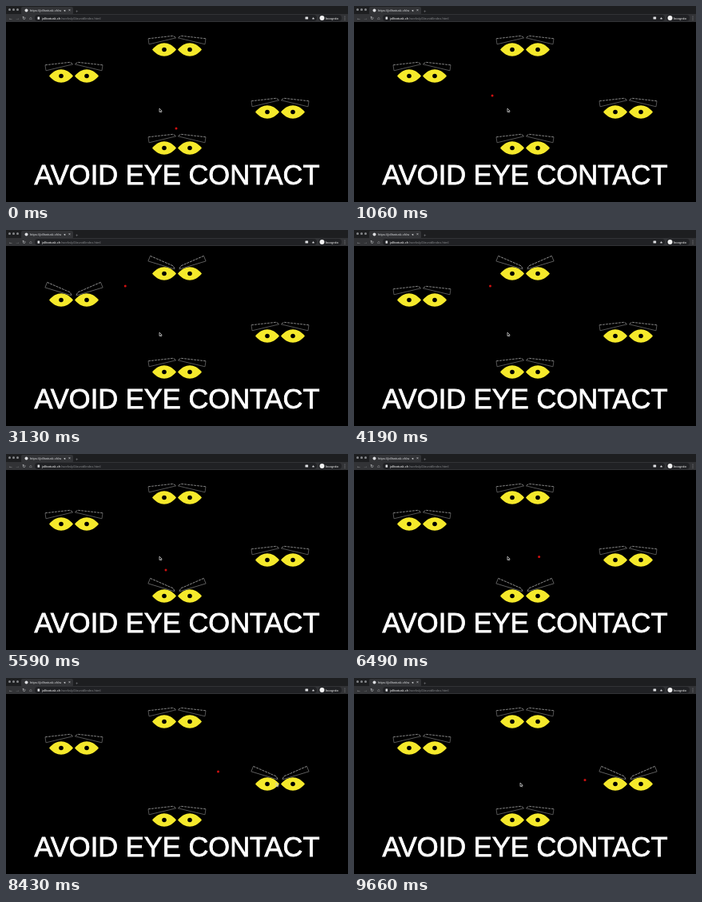
Animation, 428 px wide and 245 px high, one loop 9690 ms. Source, as an HTML page with a canvas:

```html
<!DOCTYPE html>
<html lang="en">
<head>
<meta charset="utf-8">
<title>Avoid eye contact</title>
<style>
  html, body { margin: 0; width: 100%; height: 100%; overflow: hidden; background: #000; }
  canvas { display: block; }
</style>
</head>
<body>
<canvas width="428" height="245"></canvas>
<script>
const ctx = document.querySelector('canvas').getContext('2d');
const LOOP = 9690;
const REACTION_TIME = 500;
const REACH = { x: 79, y: 50 };
const faces = [
  { x: 214, y: 54.5 }, { x: 85, y: 87.5 }, { x: 343, y: 132.5 }, { x: 214, y: 177.5 }
];

// The gaze rests on a few spots and jumps between them.
const gazePath = [
  { at: 0, x: 213, y: 153 },
  { at: 2130, x: 132, y: 70 },
  { at: 4190, x: 170.5, y: 70 },
  { at: 5590, x: 200, y: 145 },
  { at: 7390, x: 263, y: 112 },
  { at: 8430, x: 265.5, y: 117 },
  { at: 9660, x: 289, y: 127.5 }
];
const cursorPath = [
  { at: 7390, x: 192, y: 128 },
  { at: 8430, x: 338, y: 131 },
  { at: 9660, x: 208, y: 131 }
];

// Rest, quick eased move, rest.
function jump(progress) {
  const p = Math.min(1, Math.max(0, (progress - 0.3) / 0.4));
  return p * p * (3 - 2 * p);
}

function positionAt(path, time) {
  const next = path.findIndex(key => key.at > time);
  if (next === 0) return path[0];
  if (next < 0) return path[path.length - 1];
  const from = path[next - 1], to = path[next];
  const k = jump((time - from.at) / (to.at - from.at));
  return { x: from.x + (to.x - from.x) * k, y: from.y + (to.y - from.y) * k };
}

function disc(x, y, radius, color) {
  ctx.fillStyle = color;
  ctx.beginPath();
  ctx.arc(x, y, radius, 0, 2 * Math.PI);
  ctx.fill();
}

function box(x, y, w, h, radius, color) {
  ctx.fillStyle = color;
  ctx.beginPath();
  ctx.roundRect(x, y, w, h, radius);
  ctx.fill();
}

function line(points, color, dash = []) {
  ctx.strokeStyle = color;
  ctx.lineWidth = 0.8;
  ctx.setLineDash(dash);
  ctx.beginPath();
  points.forEach(([x, y]) => ctx.lineTo(x, y));
  ctx.stroke();
}

function text(string, x, y, size, color, align = 'left') {
  ctx.font = `${size}px "Liberation Sans", "DejaVu Sans", sans-serif`;
  ctx.textAlign = align;
  ctx.fillStyle = color;
  ctx.fillText(string, x, y);
}

function drawBrowser() {
  const light = '#dcdde0', dim = '#85878a', bar = '#323336', field = '#202124';

  box(0, 0, 428, 10, 0, '#1d1e20');
  for (let i = 0; i < 3; i++) disc(4.5 + 5 * i, 4.5, 1.5, dim);
  box(19, 1, 65, 10, 2, bar);
  disc(25.5, 5.5, 2, light);
  text('https://jolfantusk.ch/w', 30, 7, 4.1, light);
  text('◂', 72, 7, 4.5, light);
  text('×', 78, 7.2, 5, light);
  text('+', 87, 7.5, 6, dim);

  box(0, 10, 428, 10, 0, bar);
  [...'←→↻⌂'].forEach((icon, i) =>
    text(icon, 6 + 8.3 * i, 17, 5.5, icon === '→' ? dim : light, 'center'));
  box(36, 11, 353, 8, 4, field);
  box(39.5, 13.5, 2.6, 3.2, 0.5, light);
  text('jolfantusk.ch', 45, 16.5, 4.2, '#fff');
  text('/works/p5/avoid/index.html', 69, 16.5, 4.2, dim);
  box(374.5, 13.5, 3.6, 3, 0.5, light);
  text('★', 384.5, 16.8, 4.5, light, 'center');
  box(391, 11, 29, 8, 4, field);
  disc(395.5, 15, 3, '#f0f0f0');
  text('Incognito', 400, 16.5, 3.9, '#fff');
  text('⋮', 424, 17, 6, light, 'center');
}

function drawEye(x) {
  ctx.fillStyle = '#f5e92b';
  ctx.beginPath();
  ctx.moveTo(x - 15, 0);
  ctx.bezierCurveTo(x - 6, -11, x + 6, -11, x + 15, 0);
  ctx.bezierCurveTo(x + 6, 11, x - 6, 11, x - 15, 0);
  ctx.fill();
  disc(x, 0, 2.8, '#000');
}

function drawBrow(angry) {
  ctx.translate(-19, -13.2);
  if (angry) ctx.rotate(Math.PI / 6);
  line([[-17, -0.5], [14, -4], [18, -1.5]], '#a0a0a0', [3, 1]);
  line([[18, -1.5], [-16, 6.5], [-17, -0.5]], '#686868');
}

function drawFace({ x, y }, angry) {
  for (const side of [1, -1]) {
    ctx.save();
    ctx.translate(x, y);
    ctx.scale(side, 1);
    drawEye(-16);
    drawBrow(angry);
    ctx.restore();
  }
}

function drawTitle() {
  text('AVOID EYE CONTACT', 214, 223, 34.5, '#fff', 'center');
  ctx.setLineDash([]);
  ctx.strokeStyle = '#fff';
  ctx.lineWidth = 0.8;
  ctx.strokeText('AVOID EYE CONTACT', 214, 223);
}

function drawCursor({ x, y }) {
  const shape = [[0, 0], [0, 4.6], [1.2, 3.7], [2.2, 5.2], [1.9, 3.4], [3.2, 3.3], [0, 0]];
  line(shape.map(([dx, dy]) => [x + dx, y + dy]), '#ccc');
}

function render(now) {
  const time = now % LOOP;
  const gaze = positionAt(gazePath, time);
  const isWatched = face => time > REACTION_TIME &&
    Math.abs(face.x - gaze.x) < REACH.x && Math.abs(face.y - gaze.y) < REACH.y;

  box(0, 0, 428, 245, 0, '#000');
  drawBrowser();
  faces.forEach(face => drawFace(face, isWatched(face)));
  drawTitle();
  disc(gaze.x, gaze.y, 1.5, '#d01010');
  drawCursor(positionAt(cursorPath, time));
  requestAnimationFrame(render);
}
requestAnimationFrame(render);
</script>
</body>
</html>
```
